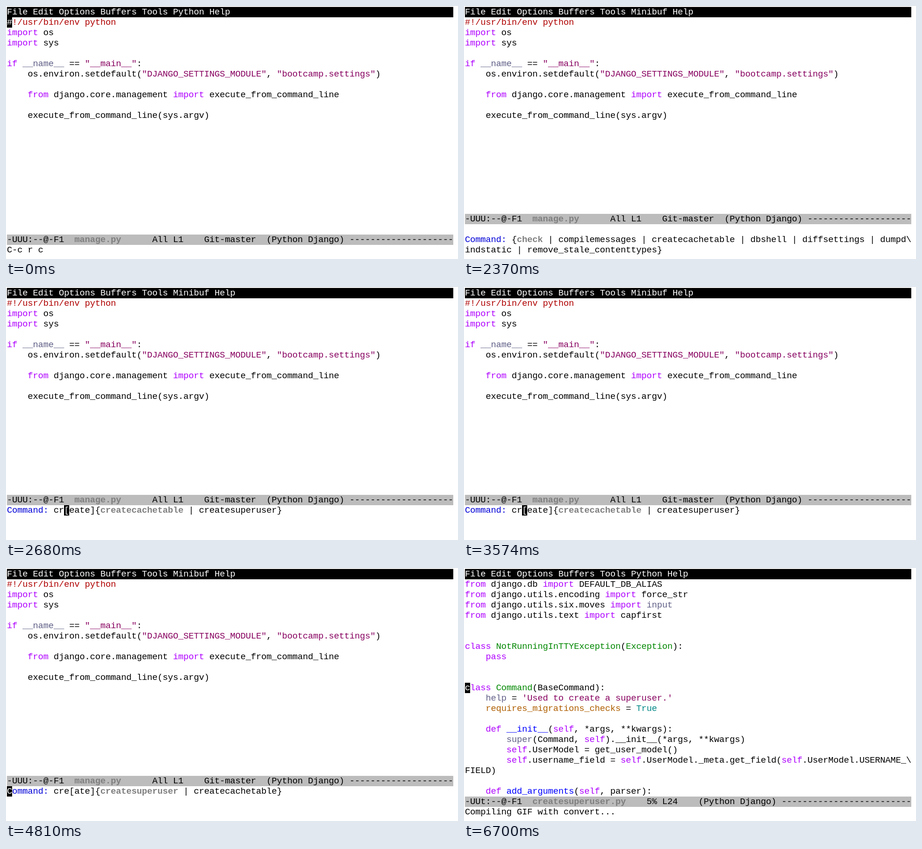
An HTML page that plays this animation: 958 by 538 pixels, repeating every 7.7 s.

```html
<!DOCTYPE html>
<html lang="en">
<head>
<meta charset="utf-8">
<title>Editor session</title>
<style>
  html, body { margin: 0; width: 100%; height: 100%; overflow: hidden; background: #fff; }
  #screen {
    position: absolute; left: 2px; top: 2px; width: 946px;
    font: 14pt/22px "Liberation Mono", "Courier New", monospace;
    letter-spacing: calc(11px - 1ch); white-space: pre; color: #000;
  }
  #screen div { height: 22px; }
  #screen .menu, #screen .cursor { background: #000; color: #fff; }
  #screen .mode { background: #bcbcbc; }
  #screen .cursor { position: absolute; width: 11px; }
  b { color: #7f7f7f; }
  .prompt { color: #0000d7; }
  .comment { color: #af0000; }
  .string { color: #87005f; }
  .keyword { color: #af00ff; }
  .builtin { color: #5f5f87; }
  .type { color: #008700; }
  .func { color: #0000ff; }
  .variable { color: #af5f00; }
  .constant { color: #008787; }
</style>
</head>
<body>
<div id="screen"></div>
<script>
const COLS = 86, LOOP = 7700;

const manage = `#!/usr/bin/env python
import os
import sys

if __name__ == "__main__":
    os.environ.setdefault("DJANGO_SETTINGS_MODULE", "bootcamp.settings")

    from django.core.management import execute_from_command_line

    execute_from_command_line(sys.argv)`;

const superuser = `from django.db import DEFAULT_DB_ALIAS
from django.utils.encoding import force_str
from django.utils.six.moves import input
from django.utils.text import capfirst


class NotRunningInTTYException(Exception):
    pass


class Command(BaseCommand):
    help = 'Used to create a superuser.'
    requires_migrations_checks = True

    def __init__(self, *args, **kwargs):
        super(Command, self).__init__(*args, **kwargs)
        self.UserModel = get_user_model()
        self.username_field = self.UserModel._meta.get_field(self.UserModel.USERNAME_\\
FIELD)

    def add_arguments(self, parser):`;

const syntax = new RegExp([
  String.raw`(?<comment>#.*)`,
  String.raw`(?<string>"[^"]*"|'[^']*')`,
  String.raw`(?<type>(?<=class )\w+|\bException\b)`,
  String.raw`(?<func>(?<=def )\w+)`,
  String.raw`(?<keyword>\b(?:import|from|if|class|pass|def|self)\b)`,
  String.raw`(?<builtin>\b(?:__name__|input|help|super)\b)`,
  String.raw`(?<variable>\brequires_migrations_checks\b)`,
  String.raw`(?<constant>\bTrue\b)`
].join("|"), "g");

const span = (cls, text) => `<span class="${cls}">${text}</span>`;

const highlight = code => code.replace(syntax, (text, ...rest) => {
  const groups = rest.at(-1);
  return span(Object.keys(groups).find(name => groups[name]), text);
});

const row = (html, cls = "") => `<div class="${cls}">${html}</div>`;

// Mode line: flags, bold buffer name, then status padded with dashes
function modeLine(flags, name, status) {
  const text = status.padEnd(COLS - flags.length - name.length, "-");
  return row(`${flags}<b>${name}</b>${text}`, "mode");
}

function view(mode, code, modeRow, modeHtml, echo, cursor) {
  const lines = highlight(code).split("\n");
  while (lines.length < modeRow - 1) lines.push("");
  let html = row(`File Edit Options Buffers Tools ${mode} Help`, "menu");
  html += lines.map(line => row(line)).join("") + modeHtml;
  html += echo.split("\n").map(line => row(line)).join("");
  if (cursor) {
    const [r, c, char] = cursor;
    html += `<div class="cursor" style="left:${c * 11}px;top:${r * 22}px">${char}</div>`;
  }
  return html;
}

const manageMode = modeLine("-UUU:--@-F1  ", "manage.py",
  "      All L1    Git-master  (Python Django) ");
const superuserMode = modeLine("-UUt:--@-F1  ", "createsuperuser.py",
  "    5% L24    (Python Django) ");

const prompt = span("prompt", "Command:") + " ";
const minibuffer = (echo, cursor) =>
  view("Minibuf", manage, 20, manageMode, echo, cursor);

// [start time in ms, screen]
const scenes = [
  [0, view("Python", manage, 22, manageMode, "C-c r c", [1, 0, "#"])],
  [2370, minibuffer(`
${prompt}{<b>check</b> | compilemessages | createcachetable | dbshell | diffsettings | dumpd\\
indstatic | remove_stale_contenttypes}`)],
  [2620, minibuffer(`${prompt}c{<b>check</b> | compilemessages | createcachetable | collectstatic | clearsessions\\
 | changepassword | createsuperuser | inspectdb | sqlsequencereset | startproject | f\\
indstatic | remove_stale_contenttypes}`, [21, 10, "{"])],
  [2680, minibuffer(`${prompt}cr[eate]{<b>createcachetable</b> | createsuperuser}`, [21, 11, "["])],
  [4170, minibuffer(`${prompt}cre[ate]{<b>createsuperuser</b> | createcachetable}`, [21, 12, "["])],
  [4810, minibuffer(`${prompt}cre[ate]{<b>createsuperuser</b> | createcachetable}`, [21, 0, "C"])],
  [6700, view("Python", superuser, 22, superuserMode, "Compiling GIF with convert...", [11, 0, "c"])]
];

const screenEl = document.getElementById("screen");
let shown = null;

function tick() {
  const t = performance.now() % LOOP;
  const scene = scenes.findLast(([start]) => start <= t);
  if (scene !== shown) {
    screenEl.innerHTML = scene[1];
    shown = scene;
  }
  requestAnimationFrame(tick);
}
tick();
</script>
</body>
</html>
```
